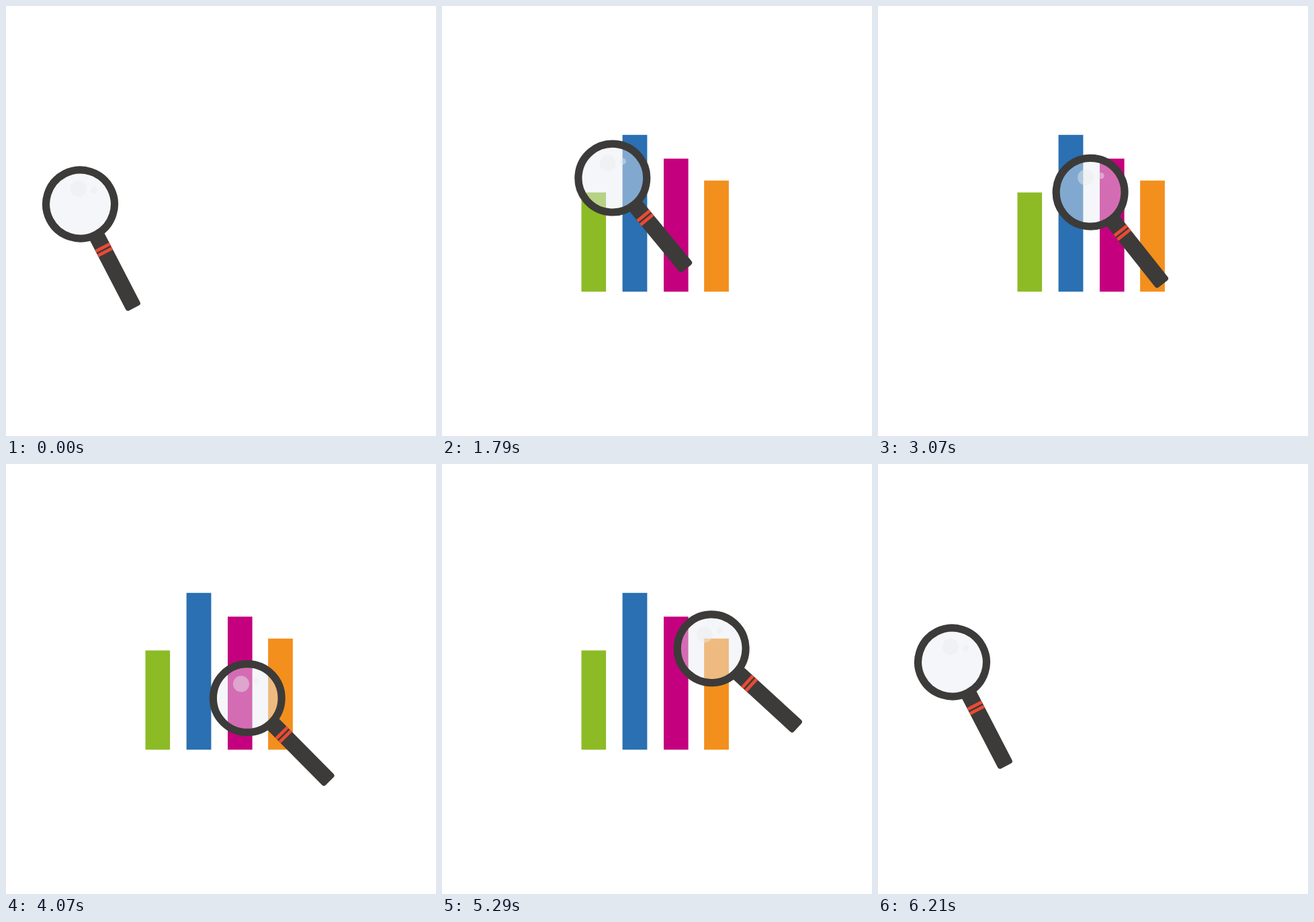
Write an HTML page that moves like this. It is 640 by 640 pixels and loops after 6.57 s.

```html
<!DOCTYPE html>
<html lang="en">
<head>
<meta charset="utf-8">
<title>Chart under a magnifier</title>
<style>
  html, body { margin: 0; width: 100%; height: 100%; overflow: hidden; background: #fff; }
  svg { display: block; width: 100%; height: 100%; }
</style>
</head>
<body>
<svg viewBox="0 0 640 640">
  <g id="bars">
    <rect x="207.5" y="-147.7" width="36.6" height="147.7" fill="#8cbb26"/>
    <rect x="268.6" y="-233.4" width="36.8" height="233.4" fill="#2a70b2"/>
    <rect x="330" y="-198" width="36.6" height="198" fill="#c4007f"/>
    <rect x="390.1" y="-165.4" width="36.8" height="165.4" fill="#f38f1d"/>
  </g>
  <g id="glass">
    <path d="M-12 50H12V170A4 4 0 0 1 8 174H-8A4 4 0 0 1 -12 170Z" fill="#3c3b39"/>
    <path d="M-12 70.5h24v4.8h-24zM-12 77.8h24v4.8h-24z" fill="#e94b35"/>
    <circle r="46" fill="#e7ebf2" fill-opacity=".46"/>
    <g fill="#ebebeb" fill-opacity=".45">
      <circle cx="8.3" cy="-21.6" r="12"/>
      <circle cx="27.8" cy="-9.3" r="4.7"/>
    </g>
    <circle r="50.9" fill="none" stroke="#3c3b39" stroke-width="11.2"/>
  </g>
</svg>
<script>
  const LOOP = 6570, STEP = LOOP / 92;
  const TURN_LAG = 170; // the handle settles a little after the lens
  const bars = document.getElementById('bars');
  const glass = document.getElementById('glass');

  const home = { x: 110.5, y: 295, angle: 27.4 };
  const stops = [
    { begin: 0, end: 820, x: 220.9, y: 301.2, angle: 42.8 },
    { begin: 1250, end: 2280, x: 283, y: 216, angle: 35 },
    { begin: 2575, end: 3640, x: 356.8, y: 352.6, angle: 44.6 },
    { begin: 3960, end: 4760, x: 404, y: 274.5, angle: 47.6 },
    { begin: 5237, end: 6057, ...home }
  ];

  const mix = (a, b, k) => a + (b - a) * k;

  // Smooth progress from 0 to 1 between two times.
  function ease(t, begin, end) {
    const u = Math.min(1, Math.max(0, (t - begin) / (end - begin)));
    return u * u * (3 - 2 * u);
  }

  function poseAt(t) {
    return stops.reduce((pose, stop) => {
      const move = ease(t, stop.begin, stop.end);
      const turn = ease(t, stop.begin, stop.end + TURN_LAG);
      return {
        x: mix(pose.x, stop.x, move),
        y: mix(pose.y, stop.y, move),
        angle: mix(pose.angle, stop.angle, turn)
      };
    }, home);
  }

  function draw(now) {
    // The motion advances in even steps of about 71 ms.
    const t = Math.floor((now % LOOP + 5) / STEP) * STEP % LOOP;
    const { x, y, angle } = poseAt(t);
    const growth = ease(t, 0, 780) - ease(t, 5320, 6170);
    bars.setAttribute('transform', `translate(0 425.2) scale(1 ${growth})`);
    glass.setAttribute('transform', `translate(${x} ${y}) rotate(${-angle})`);
  }

  const start = performance.now();
  function frame() {
    draw(performance.now() - start);
    requestAnimationFrame(frame);
  }
  frame();
</script>
</body>
</html>
```
